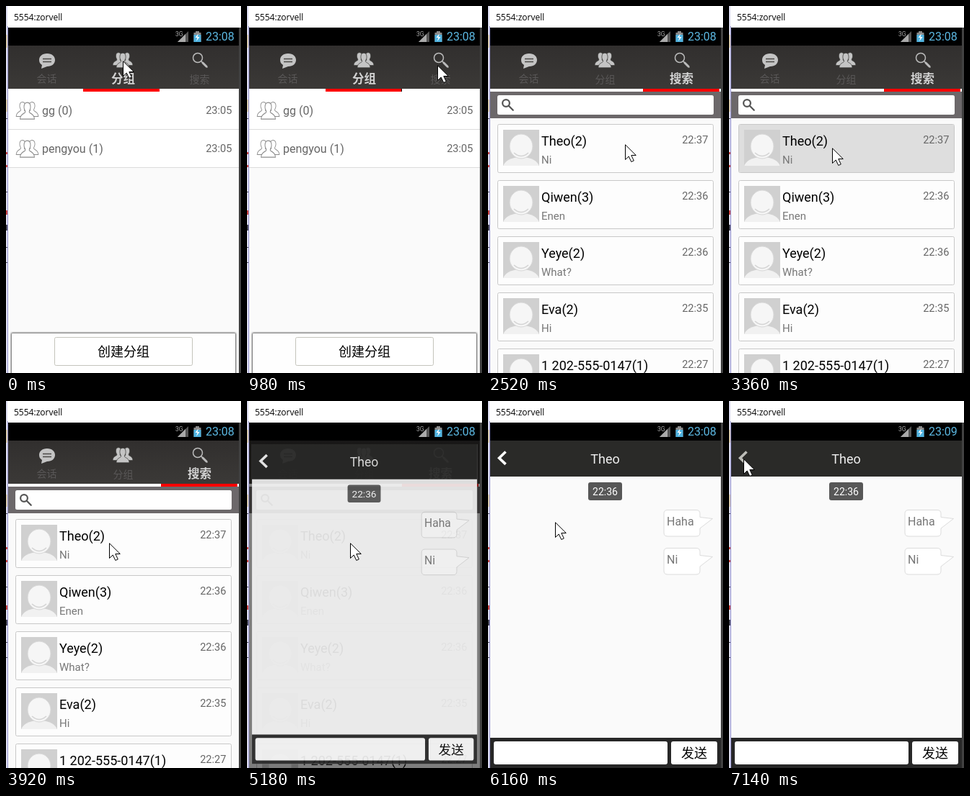
Animation of 326 by 510 pixels, one loop 8000 ms. Source, as an HTML page:

```html
<!DOCTYPE html>
<html lang="zh">
<head>
<meta charset="utf-8">
<title>Messenger demo</title>
<style>
html, body { margin: 0; width: 100%; height: 100%; overflow: hidden; background: #fff; }
svg { display: block; }
text { font-family: Roboto, "Noto Sans CJK SC", "Noto Sans CJK", sans-serif; }
.mid { text-anchor: middle; }
.end { text-anchor: end; }
.group { font-size: 16px; fill: #666; }
.time { font-size: 14.6px; fill: #666; text-anchor: end; }
.name { font-size: 18px; fill: #000; }
.last { font-size: 15px; fill: #777; }
.tab { font-size: 14px; fill: #595757; text-anchor: middle; }
.button { font-size: 18px; font-weight: 500; text-anchor: middle; }
.clock { font-size: 16px; fill: #5cb8e2; }
.outline { fill: #fff; stroke: #8c8c8c; stroke-width: 1.1; }
.solid { fill: #c4c4c4; stroke: #363533; stroke-width: .8; }
.card rect { fill: #fdfdfd; stroke: #c8c8c8; }

/* One 8 s loop sampled every 140 ms (1.75 %). */
.anim { animation: 8s step-end -2ms infinite; }
#cursor { animation-name: cursor; }
#pages { animation-name: pages; }
#bar { animation-name: bar; }
#barEnd { animation-name: barEnd; }
#tabGroup { animation-name: tabOff; }
#tabSearch { animation-name: tabOn; }
#pressed { animation-name: press; }
#dim { animation-name: dim; }
#chat { animation-name: chat; transform-origin: 163px 270px; }
#clockA { animation-name: clockA; }
#clockB { animation-name: clockB; }
#back { animation-name: back; }

@keyframes cursor {
  0% { transform: translate(162px, 76px); }
  1.75% { transform: translate(172px, 79px); }
  3.5% { transform: translate(210px, 87px); }
  5.25% { transform: translate(258px, 92px); }
  7% { transform: translate(302px, 91px); }
  8.75% { transform: translate(285px, 87px); }
  10.5% { transform: translate(268px, 83px); }
  12.25% { transform: translate(264px, 82px); }
  24.5% { transform: translate(260px, 92px); }
  26.25% { transform: translate(245px, 125px); }
  28% { transform: translate(226px, 158px); }
  29.75% { transform: translate(205px, 182px); }
  31.5% { transform: translate(190px, 192px); }
  33.25% { transform: translate(95px, 202px); }
  35% { transform: translate(37px, 204px); }
  36.75% { transform: translate(143px, 198px); }
  38.5% { transform: translate(143px, 197px); }
  77% { transform: translate(93px, 168px); }
  78.75% { transform: translate(62px, 132px); }
  80.5% { transform: translate(38px, 104px); }
  82.25% { transform: translate(25px, 88px); }
  84%, 100% { transform: translate(20px, 80px); }
}
@keyframes pages {
  0% { transform: none; }
  15.75% { transform: translateX(-112px); }
  17.5% { transform: translateX(-256px); }
  19.25% { transform: translateX(-311px); }
  21%, 100% { transform: translateX(-320px); }
}
@keyframes bar {
  0% { transform: translateX(107px); }
  12.25% { transform: translateX(109px); }
  15.75% { transform: translateX(146px); }
  17.5% { transform: translateX(194px); }
  19.25% { transform: translateX(212px); }
  21%, 100% { transform: translateX(215px); }
}
@keyframes barEnd { 0%, 15.75%, 100% { opacity: 0; } 12.25% { opacity: 1; } }
@keyframes tabOff {
  0% { font-size: 16.5px; font-weight: 700; fill: #d2d2d2; }
  15.75%, 100% { font-size: 14px; font-weight: 400; fill: #595757; }
}
@keyframes tabOn {
  0% { font-size: 14px; font-weight: 400; fill: #595757; }
  15.75%, 100% { font-size: 16.5px; font-weight: 700; fill: #d2d2d2; }
}
@keyframes press { 0%, 49%, 100% { opacity: 0; } 42% { opacity: 1; } }
@keyframes dim { 0%, 66.5%, 100% { opacity: 0; } 64.75% { opacity: .5; } }
@keyframes chat {
  0% { opacity: 0; transform: none; }
  64.75% { opacity: .88; transform: scale(.977); }
  66.5%, 100% { opacity: 1; transform: none; }
}
@keyframes clockA { 0% { opacity: 1; } 80.5%, 100% { opacity: 0; } }
@keyframes clockB { 0% { opacity: 0; } 80.5%, 100% { opacity: 1; } }
@keyframes back { 0% { stroke: #fff; } 89.25%, 100% { stroke: #bdbdb8; } }
</style>
</head>
<body>
<svg width="326" height="510" viewBox="0 0 326 510">
  <defs>
    <clipPath id="screen"><path d="M3 30h320v480H3z"/></clipPath>
    <linearGradient id="tabs" x2="0" y2="1">
      <stop stop-color="#312f2e"/><stop offset="1" stop-color="#3b3937"/>
    </linearGradient>
    <filter id="soft"><feGaussianBlur stdDeviation="1.2"/></filter>
    <path id="person" d="M0-11c4 0 5 3 5 6s-2 4-2 6 8 2 8 9h-22c0-7 8-7 8-9s-2-3-2-6 1-6 5-6z"/>
    <g id="people">
      <use href="#person" transform="translate(-6 -1) scale(.72 .85)"/>
      <use href="#person" transform="translate(6 -1) scale(.72 .85)"/>
      <use href="#person" transform="translate(0 1) scale(.82 .98)"/>
    </g>
    <symbol id="avatar" width="50" height="50" viewBox="0 0 50 50">
      <path fill="#d0d0d0" d="M0 0h50v50H0z"/>
      <ellipse cx="25" cy="52" rx="25" ry="14" fill="#f1f1f1"/>
      <ellipse cx="25" cy="23" rx="16" ry="17" fill="#f6f6f6" stroke="#d8d8d8"/>
      <path d="M15 32q10 9 20 0" fill="none" stroke="#d4d4d4" stroke-width="1.5"/>
    </symbol>
    <g id="lens" fill="none">
      <circle r="6.5"/><path d="M5 5l8 8" stroke-linecap="round"/>
    </g>
    <path id="bubble" d="M249 .5h40q5 0 5 5v5l17.500 2-17.500 13.500v6q0 5-5 5h-40q-5 0-5-5v-26.500q0-5 5-5z" fill="#fff" stroke="#dcdcdc"/>
  </defs>

  <path fill="#fff" d="M0 0h326v510H0z"/>
  <text x="11" y="19.500" font-size="12" style="font-family:'Open Sans',sans-serif">5554:zorvell</text>

  <!-- window edges -->
  <path fill="#dcdcf0" d="M0 0h2v510H0z"/>
  <path fill="#d9cbb0" d="M0 40h2v18H0zM0 130h2v17H0z"/>
  <path fill="#c44" d="M0 203h2v3H0zM0 221h2v3H0zM0 284h2v6H0z"/>
  <path fill="#445" d="M0 156h2v1H0zM0 258h2v1H0zM0 304h2v8H0zM0 335h2v1H0zM0 356h2v1H0z"/>
  <path fill="#9a98d2" d="M2 28h1v482H2z"/>
  <path fill="#414141" d="M323 30h3v480h-3z"/>

  <g clip-path="url(#screen)">
    <path fill="#fafafa" d="M3 55h320v455H3z"/>

    <g id="pages" class="anim">
      <!-- groups -->
      <path fill="#fff" d="M3 118h320v106H3z"/>
      <path stroke="#dcdcdc" d="M3 171.500h320M3 224.500h320"/>
      <use href="#people" class="outline" transform="translate(29.500 145) scale(1.1 1.12)"/>
      <use href="#people" class="outline" transform="translate(29.500 198) scale(1.1 1.12)"/>
      <text class="group" x="50" y="151">gg (0)</text>
      <text class="group" x="50" y="204">pengyou (1)</text>
      <text class="time" x="313.500" y="150">23:05</text>
      <text class="time" x="313.500" y="203">23:05</text>
      <rect x="7" y="454" width="312" height="70" rx="2" fill="#555" filter="url(#soft)"/>
      <rect x="8" y="455" width="310" height="60" rx="1" fill="#fefefe"/>
      <rect x="67.500" y="460.500" width="191" height="39" rx="2" fill="#fff" stroke="#c4c4bc"/>
      <text class="button" x="163" y="487">创建分组</text>

      <!-- search -->
      <g transform="translate(320)">
        <path fill="#6c686a" d="M3 115h320v41H3z"/>
        <rect x="13" y="124" width="300" height="27" rx="2.500" fill="#fff"/>
        <use href="#lens" transform="translate(25 135) scale(.75)" stroke="#555" stroke-width="3"/>
        <g class="card">
          <rect x="13.500" y="164.500" width="299" height="67" rx="2"/>
          <path id="pressed" class="anim" fill="#dedede" d="M14 165h298v66H14z"/>
          <use href="#avatar" x="21" y="172"/>
          <text class="name" x="74" y="194">Theo(2)</text>
          <text class="last" x="74" y="219">Ni</text>
          <text class="time" x="305.500" y="191">22:37</text>
        </g>
        <g class="card" transform="translate(0 78)">
          <rect x="13.500" y="164.500" width="299" height="67" rx="2"/>
          <use href="#avatar" x="21" y="172"/>
          <text class="name" x="74" y="194">Qiwen(3)</text>
          <text class="last" x="74" y="219">Enen</text>
          <text class="time" x="305.500" y="191">22:36</text>
        </g>
        <g class="card" transform="translate(0 156)">
          <rect x="13.500" y="164.500" width="299" height="67" rx="2"/>
          <use href="#avatar" x="21" y="172"/>
          <text class="name" x="74" y="194">Yeye(2)</text>
          <text class="last" x="74" y="219">What?</text>
          <text class="time" x="305.500" y="191">22:36</text>
        </g>
        <g class="card" transform="translate(0 234)">
          <rect x="13.500" y="164.500" width="299" height="67" rx="2"/>
          <use href="#avatar" x="21" y="172"/>
          <text class="name" x="74" y="194">Eva(2)</text>
          <text class="last" x="74" y="219">Hi</text>
          <text class="time" x="305.500" y="191">22:35</text>
        </g>
        <g class="card" transform="translate(0 312)">
          <rect x="13.500" y="164.500" width="299" height="67" rx="2"/>
          <use href="#avatar" x="21" y="172"/>
          <text class="name" x="74" y="194">1 202-555-0147(1)</text>
          <text class="time" x="305.500" y="191">22:27</text>
        </g>
      </g>
    </g>

    <!-- tabs -->
    <path fill="url(#tabs)" d="M3 55h320v60H3z"/>
    <path fill="#c4c4c4" d="M57 66c7 0 11 4 11 9s-4 9-11 9l-8 3 1-5c-3-2-4-4-4-7 0-5 4-9 11-9z"/>
    <path stroke="#4a4846" stroke-width="1.500" d="M51 73.500h12M51 77.500h12"/>
    <use href="#people" class="solid" transform="translate(162 75)"/>
    <use href="#lens" transform="translate(266 72)" stroke="#bbb" stroke-width="1.500"/>
    <path stroke="#bbb" stroke-width="3" stroke-linecap="round" d="M273 79l5 5"/>
    <text class="tab" x="56.500" y="106">会话</text>
    <text id="tabGroup" class="tab anim" x="162.500" y="107">分组</text>
    <text id="tabSearch" class="tab anim" x="268.500" y="107">搜索</text>
    <path fill="#fff" d="M3 115h320v4H3z"/>
    <path id="bar" class="anim" fill="#f00" d="M0 115h106v4H0z"/>
    <path id="barEnd" class="anim" fill="#111" d="M214 115h1v4h-1z"/>

    <path id="dim" class="anim" d="M3 55h320v455H3z"/>

    <!-- conversation -->
    <g id="chat" class="anim">
      <path fill="#fafafa" d="M3 55h320v455H3z"/>
      <path fill="#2a2a28" d="M3 55h320v50H3z"/>
      <path id="back" class="anim" fill="none" stroke-width="3.600" d="M24.500 70.500l-9 8.700 9 8.700"/>
      <text class="mid" x="162.500" y="87" font-size="18" fill="#eee">Theo</text>
      <rect x="139" y="113" width="47" height="25" rx="3" fill="#575757"/>
      <text class="mid" x="162.500" y="131" font-size="14" fill="#fff">22:36</text>
      <use href="#bubble" y="151"/>
      <use href="#bubble" y="204"/>
      <text class="group" x="248" y="173" style="fill:#777">Haha</text>
      <text class="group" x="248" y="226" style="fill:#777">Ni</text>
      <path fill="#272727" d="M3 468h320v42H3z"/>
      <rect x="8" y="473" width="241" height="32" rx="3" fill="#fff"/>
      <rect x="254" y="473" width="64" height="32" rx="3" fill="#fff"/>
      <text class="button" x="286" y="496">发送</text>
    </g>

    <!-- status bar -->
    <path d="M3 30h320v25H3z"/>
    <text x="235" y="42" font-size="8.500" fill="#aaa">3G</text>
    <path fill="#555" d="M253 35v15h-15z"/>
    <path fill="#aaa" d="M249 39v11h-11z"/>
    <path fill="#8a8a8a" d="M263 35h5v2h2.500v13h-10V37h2.500z"/>
    <path fill="#4fb3e0" d="M260.500 40h10v10h-10z"/>
    <path fill="#fff" d="M267 38l-4.500 6h3l-1.500 5 4.500-6h-3z"/>
    <text id="clockA" class="clock anim" x="277" y="48">23:08</text>
    <text id="clockB" class="clock anim" x="277" y="48">23:09</text>
  </g>

  <path id="cursor" class="anim" fill="#fff" stroke="#000" d="M.5.8v20.700l4.700-4.500 3.600 7.500 3.500-1.600-3.500-7.400h6.500z"/>
</svg>
</body>
</html>
```
